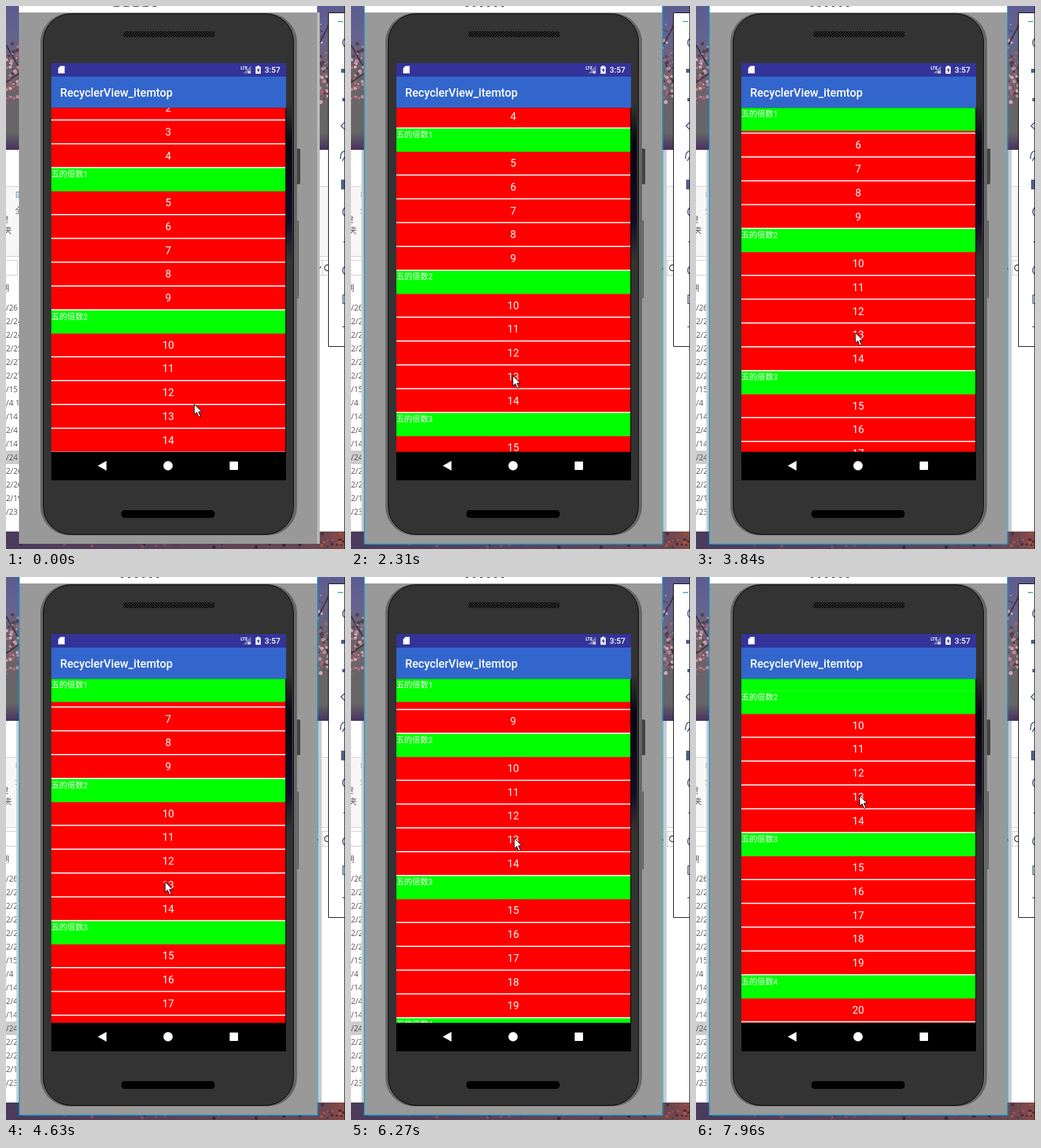
An HTML page for the animation above (7.99 s loop, 523 px wide and 838 px high).

```html
<!DOCTYPE html>
<html lang="zh">
<head>
<meta charset="utf-8">
<title>Sticky list headers</title>
<style>
  html, body { margin: 0; width: 100%; height: 100%; overflow: hidden; background: #fff; }
  svg { display: block; }
  text { font-family: Roboto, "Noto Sans CJK SC", "Noto Sans CJK", sans-serif; fill: #fff; }
  .number { font-size: 16px; text-anchor: middle; }
  .header { font-size: 12.3px; }
  .explorer text { font: 12px "Open Sans", "Noto Sans CJK SC", "Noto Sans CJK", sans-serif; fill: #555; }
</style>
</head>
<body>
<svg width="523" height="838" viewBox="0 0 523 838">
  <defs>
    <linearGradient id="sky" x2="0" y2="1">
      <stop offset="0" stop-color="#5d5c90"/>
      <stop offset=".25" stop-color="#66648c"/>
      <stop offset=".45" stop-color="#6b626b"/>
      <stop offset=".88" stop-color="#666"/>
      <stop offset="1" stop-color="#49305f"/>
    </linearGradient>
    <linearGradient id="ground">
      <stop offset="0" stop-color="#4b3a5c"/>
      <stop offset=".5" stop-color="#5c4258"/>
      <stop offset=".94" stop-color="#6b4650"/>
      <stop offset="1" stop-color="#8d4a45"/>
    </linearGradient>
    <linearGradient id="glare" x2="0" y2="1">
      <stop offset="0" stop-color="#333"/>
      <stop offset=".25" stop-color="#08060f"/>
      <stop offset=".75" stop-color="#120b26"/>
      <stop offset="1" stop-color="#333"/>
    </linearGradient>
    <pattern id="mesh" width="4" height="4" patternUnits="userSpaceOnUse">
      <path d="M0 0h2v2h-2zM2 2h2v2h-2z" fill="#000"/>
    </pattern>
    <clipPath id="listArea"><path d="M70 157H431V688H70z"/></clipPath>
  </defs>

  <!-- Desktop -->
  <path d="M0 0H523V222H0z" fill="url(#sky)"/>
  <g id="blossoms"></g>
  <path d="M0 222H523V811H0z" fill="#fff"/>
  <path d="M0 811H523V838H0z" fill="url(#ground)"/>
  <g id="petals"></g>

  <!-- File explorer edges -->
  <g class="explorer">
    <path d="M0 279H20V386H0zM480 279H498V386H480z" fill="#f7f7f8"/>
    <path d="M0 278.5H20M0 386.5H20M0 392.5H17.5V415.5H0M480 278.5H498M480 386.5H498M480 392.5H498M480 415.5H498M488.5 393V415"
          fill="none" stroke="#ccc"/>
    <path d="M0 686H20V707H0z" fill="#ccc"/>
    <path d="M16 287h4v8h-4z" fill="none" stroke="#3a8aa8"/>
    <text x="14" y="320">全</text>
    <text x="-8" y="334">建</text>
    <text x="-3" y="351">夹</text>
    <text x="-7" y="440">期</text>
    <g id="dates"></g>
    <path d="M479 403l3 4 4-5M498 400a4.5 4.5 0 1 0 0 8" fill="none" stroke="#444" stroke-width="1.4"/>
  </g>

  <!-- Tool panel -->
  <path d="M497.5 10.5H523V525.5H497.5z" fill="#fff" stroke="#000"/>
  <g fill="none" stroke="#50608c" stroke-width="1.7">
    <path d="M512 24H520" stroke="#4fae9c"/>
    <path d="M523 50a8 8 0 0 0 0 13M523 179l-6 6 6 6M516 236q0-12 7-12M519 239l4-7M523 311a8 8 0 0 0 0 13M523 402a7 7 0 0 0 0 12M523 446h-3v13h3M519 495h4"/>
    <path d="M517 97h6v6h-6zM519 142h4v5h-4zM517 268h6v15h-6zM523 361l-3 4h3z" fill="#50608c" stroke="none"/>
  </g>
  <path d="M522.5 0V838" stroke="#222"/>

  <!-- Emulator window -->
  <path d="M20 0H480V11H20z" fill="#fff"/>
  <path d="M20 10H480V830H20z" fill="#999"/>
  <g id="inactive">
    <path d="M480 10H484V830H480z" fill="#bbb"/>
    <path d="M166 .5H232" stroke="#333" stroke-dasharray="9 6"/>
  </g>
  <g id="active">
    <path d="M16 222H20V811H16zM482 222H487V811H482z" fill="#ccc"/>
    <path d="M20.5 0V830.5H481V0" fill="none" stroke="#0a9bd2" stroke-width="1.4"/>
    <path d="M177 .5H236" stroke="#222" stroke-dasharray="4 7"/>
  </g>

  <!-- Phone -->
  <path d="M448 220h4q2 0 2 2v51q0 2-2 2h-4z" fill="#444"/>
  <path d="M450.5 331V451" stroke="#555" stroke-width="2"/>
  <rect x="53" y="11" width="396" height="806" rx="45" fill="#666"/>
  <rect x="57.5" y="12" width="386" height="803.5" rx="43" fill="#333" stroke="#000"/>
  <path d="M432 150H441V392H432z" fill="url(#glare)"/>
  <path d="M443.5 390V692" stroke="#000"/>
  <rect x="181" y="39" width="141" height="9" rx="4" fill="url(#mesh)"/>
  <rect x="178" y="778" width="144" height="12" rx="5" fill="#000"/>

  <!-- Screen -->
  <path d="M70 88H432V732H70z" fill="#000"/>
  <path d="M70 88H432V109H70z" fill="#339"/>
  <path d="M70 109H432V157.5H70z" fill="#36c"/>
  <path d="M84 92.500h6.500v11.500h-10v-8z" fill="#fff"/>
  <text x="362" y="98" font-size="6.500" font-weight="700">LTE</text>
  <path d="M366 104L378 92V104z" fill="#7777b8"/>
  <path d="M373.500 100.500l3.500 3.500m0-3.500l-3.500 3.500" stroke="#fff" stroke-width="1.200"/>
  <path d="M385 93.500h2.500v-1.500h3v1.500h2.500v11h-8z" fill="#fff"/>
  <path d="M389.800 95l-3 4.500h2v3.500l3-4.800h-2z" fill="#339"/>
  <text x="399" y="103" font-size="12.300" font-weight="500">3:57</text>
  <text x="83.500" y="140" font-size="17.500" font-weight="500">RecyclerView_itemtop</text>
  <path d="M141.500 709.500L155 702V717z" fill="#fff"/>
  <circle cx="250" cy="709.500" r="7.200" fill="#fff"/>
  <rect x="345" y="703" width="13" height="13" rx="1" fill="#fff"/>

  <g clip-path="url(#listArea)">
    <path d="M70 157H431V688H70z" fill="#fff"/>
    <g id="list"></g>
    <g id="sticky"></g>
    <path d="M70 157H431V158H70z" opacity=".25"/>
  </g>

  <path id="cursor" d="M.5 .5V16.500L4.300 13L7.300 20.300L10 19.200L7 12.200H12z" fill="#fff" stroke="#000"/>
</svg>

<script>
const LOOP = 7990, ACTIVATE = 540;
const LIST_TOP = 157, HEADER = 35.75, PITCH = 36.75, ROW = 35;
const GROUP = HEADER + 5 * PITCH;

// time, center of row 10, cursor x, cursor y
const KEYS = [
  [0, 523, 290, 614], [100, 523, 290, 614], [570, 523, 253, 631], [830, 523, 253, 631],
  [1460, 499, 253, 607], [3020, 431, 246, 539], [4630, 365, 245, 470], [5630, 326, 251, 432],
  [7050, 258, 252, 367], [7350, 246.5, 252, 355], [7960, 229, 252, 337], [LOOP, 228.5, 252, 336.5]
];

const $ = id => document.getElementById(id);
const times = (n, make) => Array.from({ length: n }, (_, i) => make(i)).join('');
const move = (el, x, y) => el.setAttribute('transform', `translate(${x} ${y})`);

let seed = 7;
const random = (from, to) => {
  seed = seed * 16807 % 2147483647;
  return from + (to - from) * seed / 2147483647;
};

const header = (group, y, height = HEADER) =>
  `<rect x="70" y="${y}" width="361" height="${height}" fill="#0f0"/>
   <text class="header" x="70" y="${y + 13.8}">五的倍数${group}</text>`;

const row = (n, y) =>
  `<rect x="70" y="${y}" width="361" height="${ROW}" fill="#f00"/>
   <text class="number" x="250.2" y="${y + 23.2}">${n}</text>`;

// Headers run slightly under the first row so no seam shows while scrolling
$('list').innerHTML = times(5, g =>
  header(g, g * GROUP, HEADER + 1) +
  times(5, i => row(g * 5 + i, g * GROUP + HEADER + i * PITCH)));

const dates = '/26 2/24 2/24 2/25 2/27 2/27 /15 /4_1 /14 2/4 /14 /24 2/26 2/26 2/19 /23'.split(' ');
$('dates').innerHTML = times(dates.length, i =>
  `<text x="0" y="${470 + i * 21.03}">${dates[i].replace('_', ' ')}</text>`);

const dots = (n, x0, x1, y0, y1, colors) => times(n, i =>
  `<circle cx="${random(x0, x1)}" cy="${random(y0, y1)}" r="${random(1, 3)}" fill="${colors[i % colors.length]}"/>`);
const pinks = ['#c08a98', '#9b6674', '#d6a5aa', '#5a4048'];
$('blossoms').innerHTML =
  '<path d="M0 60L20 95M0 118L20 104M482 60L498 30M482 80L498 120" stroke="#40303a" stroke-width="2"/>' +
  dots(45, 0, 20, 58, 150, pinks) + dots(50, 480, 498, 28, 150, pinks);
$('petals').innerHTML = dots(60, 0, 523, 814, 836, ['#33283f', '#7d4c58', '#4d3d68']) +
  dots(12, 480, 523, 814, 836, ['#a8553f', '#3c2a40']);

function pose(t) {
  const i = KEYS.findIndex(key => key[0] > t);
  const a = KEYS[i - 1], b = KEYS[i];
  const f = (t - a[0]) / (b[0] - a[0]);
  return a.map((v, k) => v + (b[k] - v) * f);
}

let stuck = 0;
function draw(t) {
  const [, center, x, y] = pose(t);
  const scroll = center - ROW / 2 - HEADER - 2 * GROUP;
  move($('list'), 0, scroll);
  move($('cursor'), x, y);

  // The pinned header stays at the top until the next one pushes it out
  const group = Math.max(0, Math.floor((LIST_TOP - scroll) / GROUP));
  if (group !== stuck) {
    stuck = group;
    $('sticky').innerHTML = group ? header(group, 0) : '';
  }
  move($('sticky'), 0, Math.min(LIST_TOP, scroll + (group + 1) * GROUP - HEADER));

  const active = t >= ACTIVATE;
  $('active').style.display = active ? '' : 'none';
  $('inactive').style.display = active ? 'none' : '';
}

const start = performance.now();
function tick() {
  draw((performance.now() - start) % LOOP);
  requestAnimationFrame(tick);
}
tick();
</script>
</body>
</html>
```
